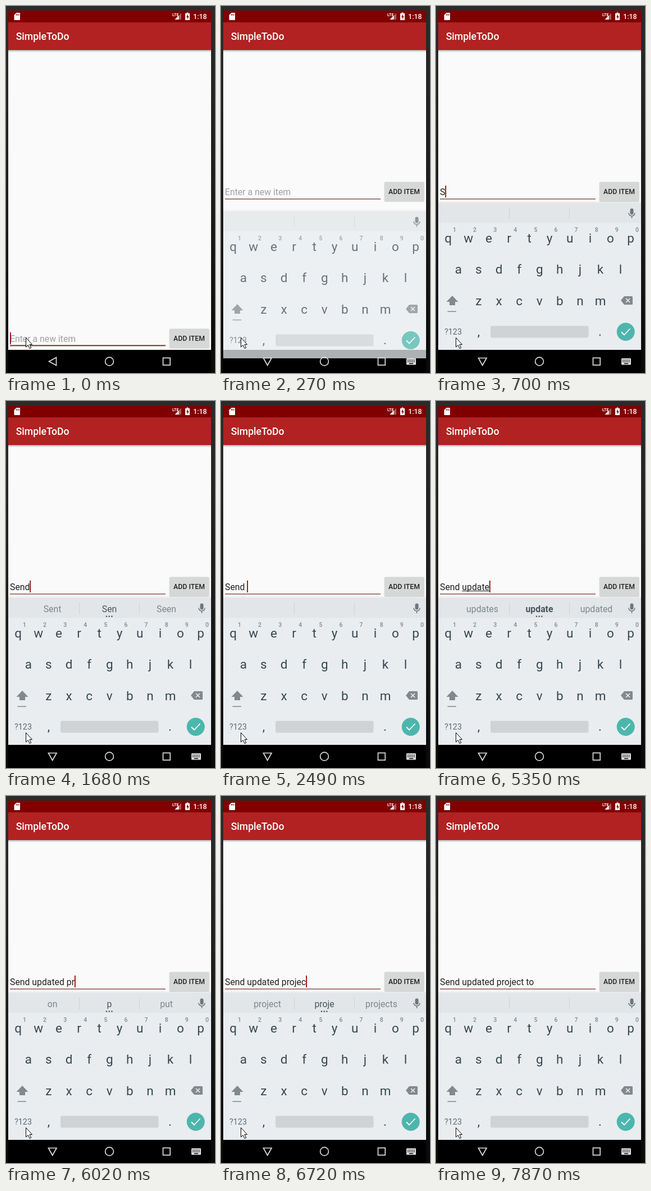
An HTML page for the animation above (8 s loop, 372 px wide and 650 px high).

```html
<!DOCTYPE html>
<html lang="en">
<head>
<meta charset="utf-8">
<title>To-do typing</title>
<style>
  html, body { margin: 0; width: 100%; height: 100%; overflow: hidden; background: #111; }
  svg { display: block; width: 372px; height: 650px; font-family: Roboto, sans-serif; }
  text { white-space: pre; }
  .mid { text-anchor: middle; }
  .medium { font-weight: 500; }
  .body { font-size: 15.8px; }
  .key { font-size: 22.5px; fill: #37474f; }
  .digit { font-size: 10.5px; font-weight: 500; fill: #80888c; }
  .line { fill: none; stroke: #dcdcdc; stroke-width: 1.7; }
  .gray { fill: #82898d; }
</style>
</head>
<body>
<svg viewBox="0 0 372 650">
  <defs>
    <linearGradient id="desk" x2="0" y2="1">
      <stop stop-color="#2b2b2b"/><stop offset=".5" stop-color="#1d1d1d"/><stop offset="1" stop-color="#090909"/>
    </linearGradient>
    <linearGradient id="shade" x2="0" y2="1">
      <stop stop-color="#000" stop-opacity=".28"/><stop offset="1" stop-color="#000" stop-opacity="0"/>
    </linearGradient>
    <linearGradient id="lift" x2="0" y2="1">
      <stop stop-color="#000" stop-opacity="0"/><stop offset="1" stop-color="#000" stop-opacity=".08"/>
    </linearGradient>
  </defs>

  <rect width="372" height="650" fill="url(#desk)"/>
  <rect x="4" y="8" width="361" height="601" fill="#fafafa"/>
  <rect x="4" y="8" width="361" height="21" fill="#800000"/>
  <rect x="4" y="29" width="361" height="49" fill="#b22222"/>
  <rect x="4" y="78" width="361" height="4" fill="url(#shade)"/>
  <rect x="4" y="609" width="361" height="41"/>
  <text class="medium" x="17.7" y="60" font-size="17.6" fill="#fff">SimpleToDo</text>

  <g id="status" fill="#fff">
    <path d="M18.5 12H24q1 0 1 1V24q0 1-1 1H15.500q-1 0-1-1V16Z"/>
    <path d="M18.500 14v3M20.700 14v3M22.900 14v3" stroke="#800000"/>
    <text x="296" y="17.500" font-size="7" font-weight="700" textLength="">LTE</text>
    <path d="M312 12.500V24H300.500Z" opacity=".35"/>
    <path d="M307.500 17V24H300.500Z"/>
    <path d="M321.500 11.500h3v1.500h2.500V25h-8V13h2.500Z"/>
    <path d="M323.800 14.500l-3 5h2v4l3-5.200h-2Z" fill="#800000"/>
    <text class="medium" x="333.300" y="23" font-size="12.300">1:18</text>
  </g>

  <g id="entry">
    <text id="hint" class="body" x="7" y="335" fill="#a0a0a0">Enter a new item</text>
    <text id="typed" class="body" x="7" y="335" fill="#212121"></text>
    <rect id="compose" y="336" height="1" fill="#212121"/>
    <rect id="rule" x="7" width="277"/>
    <rect id="caret" y="318" width="1.700" height="21" fill="#8b0000"/>
    <rect x="290.500" y="312" width="71.500" height="35" rx="2" opacity=".12"/>
    <rect x="291" y="311.500" width="70.500" height="34" rx="2" fill="#d6d7d7"/>
    <text class="mid medium" x="326" y="332.500" font-size="12.300" fill="#212121">ADD ITEM</text>
  </g>

  <g id="keyboard">
    <rect x="4" y="345" width="361" height="4" fill="url(#lift)"/>
    <rect x="4" y="349" width="361" height="260" fill="#e9edf0"/>
    <rect x="4" y="349" width="361" height="35" fill="#e3e6e8"/>
    <path d="M130.500 357v21M237.500 357v21" stroke="#d0d4d6"/>
    <g id="words" class="body mid">
      <text x="82.500" y="373.500" fill="#7d868b"></text>
      <text x="184" y="373.500" fill="#47555c"></text>
      <text x="285.500" y="373.500" fill="#7d868b"></text>
    </g>
    <g id="dots" fill="#47555c">
      <circle cx="179" cy="381.500" r="1.300"/><circle cx="183.700" cy="381.500" r="1.300"/><circle cx="188.400" cy="381.500" r="1.300"/>
    </g>
    <g id="mic">
      <rect x="345.500" y="358.500" width="6" height="11" rx="3" fill="#6c777d"/>
      <path d="M343 366.500a5.500 5.500 0 0 0 11 0M348.500 372v4" fill="none" stroke="#6c777d" stroke-width="1.500"/>
    </g>
    <g id="keys"></g>
    <path class="gray" d="M29 513L39.500 524H34v6H24v-6H18.500Z"/>
    <rect class="gray" x="20.500" y="540.300" width="15.500" height="1.500"/>
    <path class="gray" d="M335 514H348.500q1.500 0 1.500 1.500V527.500q0 1.500-1.500 1.500H335L329 521.500Z"/>
    <path d="M338 518l7 7M345 518l-7 7" stroke="#e9edf0" stroke-width="1.700"/>
    <text class="mid" x="30.500" y="582" font-size="14.300" fill="#5f6b71">?123</text>
    <rect x="97" y="566.500" width="174.500" height="21" rx="3" fill="#cfd3d6"/>
    <circle cx="337.700" cy="577" r="16" fill="#4db6ac"/>
    <path d="M330 577.500l5 5L345.500 571.500" fill="none" stroke="#fff" stroke-width="1.800"/>
  </g>

  <path id="back" class="line" d="M76.500 629.500L89.500 622.500V636.500Z"/>
  <g id="hide">
    <path class="line" d="M75.500 623.500H90L82.700 636.500Z"/>
    <rect x="330" y="624" width="17" height="11.500" rx="1.200" fill="#dcdcdc"/>
    <path d="M332 627.200h13M332 630h13" stroke="#000" stroke-width="1.500" stroke-dasharray="1.500 1.300"/>
    <path d="M335 633.300h7" stroke="#000" stroke-width="1.400"/>
  </g>
  <circle class="line" cx="184" cy="629.500" r="7.400"/>
  <rect class="line" x="279.500" y="623.300" width="12.700" height="12.700"/>

  <path d="M35.500 587.500V604L39.300 600.500L42 606.500L44.700 605.300L42 599.500H46.500Z" fill="#fff" stroke="#000"/>
</svg>

<script>
const LOOP = 8000;
const $ = id => document.getElementById(id);
const show = (id, on) => $(id).style.display = on ? "" : "none";

// Each entry: start time, typed text, suggestions, whether the last word is underlined.
const typing = [
  [0, "", ""],
  [700, "S", ""],
  [830, "S", "Se S So", true],
  [1380, "Se", "Se S So"],
  [1530, "Sen", "See Se Seen"],
  [1680, "Send", "Sent Sen Seen"],
  [1810, "Send", "Sent Send Sending", true],
  [2240, "Send ", "Sent Send Sending"],
  [2490, "Send ", ""],
  [4650, "Send u", ""],
  [4800, "Send up", "you u up"],
  [4930, "Send upd", "upon up update", true],
  [5080, "Send upda", "update upd updated"],
  [5200, "Send updat", "update upda updated"],
  [5350, "Send update", "updates update updated", true],
  [5500, "Send updated", "updates update updated"],
  [5620, "Send updated ", ""],
  [5750, "Send updated p", ""],
  [5900, "Send updated pr", "on p put"],
  [6050, "Send updated pro", "price pr pretty"],
  [6170, "Send updated proj", "projected proj projects", true],
  [6600, "Send updated proje", "project proje projects", true],
  [6720, "Send updated projec", "project proje projects"],
  [6870, "Send updated project", "project projec projects"],
  [7000, "Send updated project", "projected project projects", true],
  [7130, "Send updated project ", ""],
  [7270, "Send updated project t", ""],
  [7400, "Send updated project to", "the t to"],
  [7560, "Send updated project to ", ""]
];
const exactWords = ["Send", "update", "project"];
const caretOff = [[150, 700], [2770, 3290], [3820, 4250], [7870, LOOP]];

// Keyboard entrance: start time, drop in px, opacity.
const entrance = [[0, 26, 0], [150, 24, .2], [270, 15, .75], [420, 0, 1]];

const at = (list, t) => list.findLast(step => step[0] <= t);

function addKey(label, x, y, cls) {
  const el = document.createElementNS("http://www.w3.org/2000/svg", "text");
  el.setAttribute("class", "mid " + cls);
  el.setAttribute("x", x);
  el.setAttribute("y", y);
  el.textContent = label;
  $("keys").append(el);
}

[["qwertyuiop", 21.7, 419], ["asdfghjkl", 39.8, 474], ["zxcvbnm", 75.9, 529.5]].forEach(([row, x, y]) =>
  [...row].forEach((c, i) => addKey(c, x + i * 36.1, y, "key")));
[..."1234567890"].forEach((c, i) => addKey(c, 33 + i * 36.1, 400, "digit"));
addKey(",", 76, 584, "key");
addKey(".", 292, 584, "key");

let current;
function setTyping(step) {
  if (step === current) return;
  current = step;
  const [, text, suggestions, underlined] = step;
  const typed = $("typed");
  const width = s => {
    typed.textContent = s;
    return s ? typed.getComputedTextLength() : 0;
  };
  const start = 7 + width(text.slice(0, text.lastIndexOf(" ") + 1));
  const end = 7 + width(text);
  $("caret").setAttribute("x", end);
  $("compose").setAttribute("x", start);
  $("compose").setAttribute("width", end - start);
  show("compose", underlined);
  show("hint", !text);
  show("dots", suggestions);
  const words = suggestions.split(" ");
  [...$("words").children].forEach((el, i) => {
    el.textContent = words[i] || "";
    el.style.fontWeight = i === 1 && exactWords.includes(words[1]) ? 700 : 400;
  });
}

function draw() {
  const t = performance.now() % LOOP;
  const open = t >= 150;
  const [, drop, opacity] = at(entrance, t);
  $("keyboard").setAttribute("transform", `translate(0 ${drop})`);
  $("keyboard").setAttribute("opacity", opacity);
  $("entry").setAttribute("transform", `translate(0 ${open ? 0 : 260})`);
  $("rule").setAttribute("y", open ? 341.2 : 340.5);
  $("rule").setAttribute("height", open ? 1.3 : 1.8);
  $("rule").setAttribute("fill", open ? "#80383a" : "#8b1018");
  show("back", !open);
  show("hide", open);
  setTyping(at(typing, t));
  show("caret", !caretOff.some(([from, to]) => t >= from && t < to));
  requestAnimationFrame(draw);
}
draw();
</script>
</body>
</html>
```
